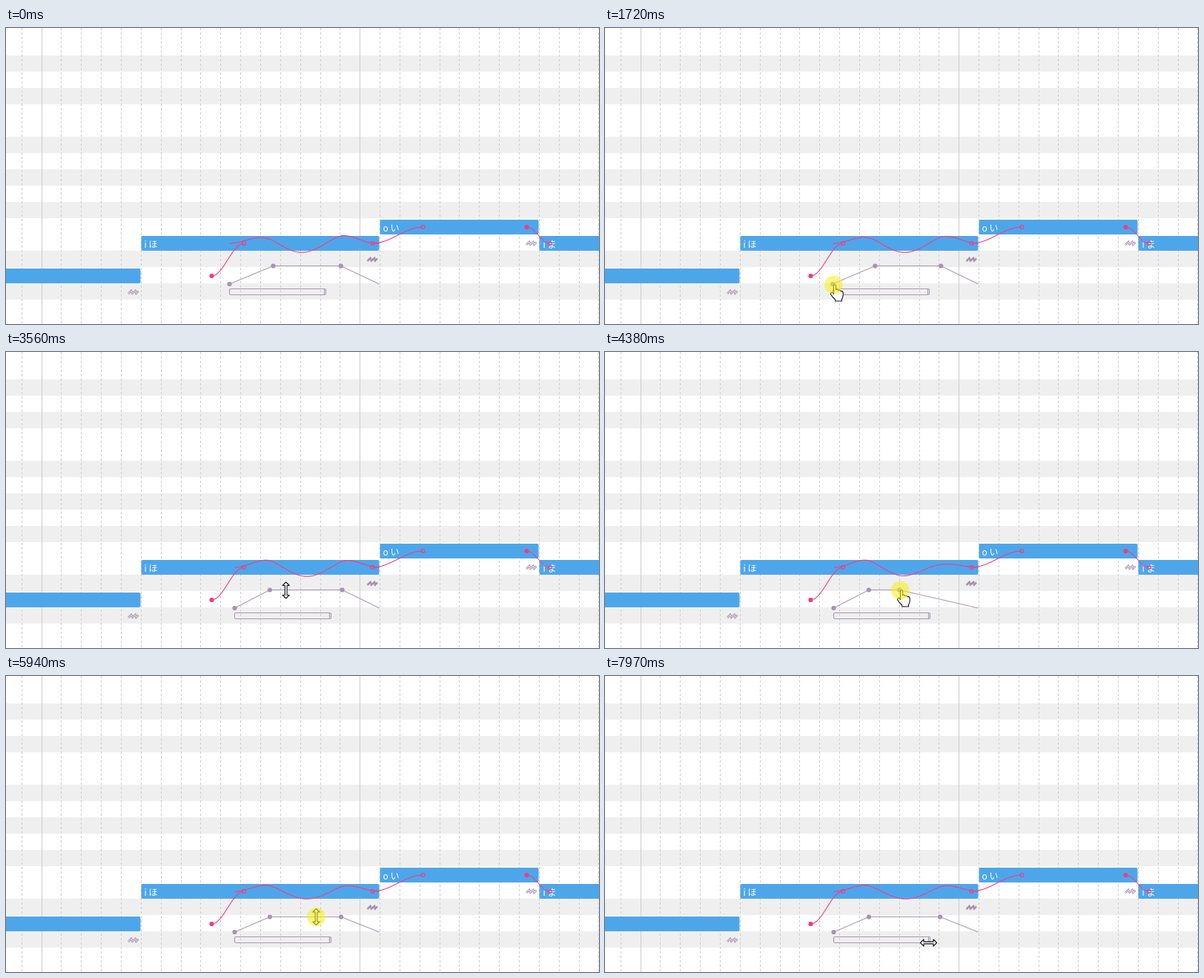
An HTML page for the animation above (8000 ms loop, 800 by 400 pixels).

```html
<!DOCTYPE html>
<html lang="ja">
<head>
<meta charset="utf-8">
<title>Vibrato editing</title>
<style>
html, body { margin: 0; width: 100%; height: 100%; overflow: hidden; background: #fff; }
svg { display: block; width: 800px; height: 400px; }
text { font: 300 12px "Noto Sans CJK JP", "Noto Sans CJK", sans-serif; fill: #fff; white-space: pre; }
.note { fill: #4ea6ea; }
.pitch { fill: none; stroke: #f8397f; stroke-width: 1.1; }
.knob { fill: #f8397f; }
.vib { fill: none; stroke: #a898b0; stroke-width: 1.1; }
.dot { fill: #a892b2; }
.cursor { fill: #fff; stroke: #111; stroke-width: 1.1; stroke-linejoin: round; }
#press { fill: #f5f01e; opacity: .58; }
</style>
</head>
<body>
<svg viewBox="0 0 800 400">
  <rect width="800" height="400" fill="#fff"/>
  <g id="grid"></g>
  <g class="note">
    <rect x="-5" y="325" width="186.5" height="20" rx="2"/>
    <rect x="182.5" y="281" width="321" height="20" rx="2"/>
    <rect x="504.5" y="259" width="214" height="20" rx="2"/>
    <rect x="719.5" y="281" width="90" height="20" rx="2"/>
  </g>
  <text x="186.5" y="296.7">i ほ</text>
  <text x="508.5" y="274.7">o い</text>
  <text x="724.5" y="296.7">i ま</text>
  <g id="icons" fill="none"></g>
  <g id="bends"></g>
  <path id="wave" class="pitch"/>
  <path id="env" class="vib"/>
  <g class="dot">
    <circle id="dotS" r="3.1" cy="346"/>
    <circle id="dotA" r="3.1"/>
    <circle id="dotB" r="3.1"/>
  </g>
  <g id="period" class="vib">
    <rect x=".5" y="352.5" width="130" height="8" rx="1.5"/>
    <path d="M128.5 352.5v8"/>
  </g>
  <path id="cursor" class="cursor"/>
  <circle id="press" r="12.3"/>
</svg>
<script>
const LOOP = 8000, STEP = 100, END = 503.5, BASE = 346, MID = 291, PERIOD = 130;
const $ = id => document.getElementById(id);
const set = (el, attrs) => { for (const k in attrs) el.setAttribute(k, attrs[k]); };
function add(parent, tag, attrs) {
  const el = document.createElementNS('http://www.w3.org/2000/svg', tag);
  set(el, attrs);
  parent.appendChild(el);
}

// Piano roll: one row per semitone, black keys shaded
for (let row = 0; row < 18; row++)
  if ('010100101010010100'[row] === '1')
    add($('grid'), 'rect', { y: 15 + row * 22, width: 800, height: 22, fill: '#efefef' });
for (let k = -1; k < 29; k++) {
  const x = Math.floor(48.05 + k * 26.854) + .5, bar = k % 16 === 0;
  add($('grid'), 'path', { d: `M${x} 0V400`, stroke: '#cbcbcb', 'stroke-dasharray': bar ? 'none' : '3 3' });
}

// Vibrato toggles
function icon(x, y, hollow) {
  const d = `M${x - 6} ${y + 2}l4-4 1.5 3.5 4-3.5 1 3.5 3-3`;
  add($('icons'), 'path', { d, stroke: '#a692b0', 'stroke-width': 2.6 });
  if (hollow) add($('icons'), 'path', { d, stroke: hollow, 'stroke-width': .9 });
}
icon(171, 357, '#efefef');
icon(493.5, 313);
icon(708, 291, '#fff');

// Pitch bends between neighbouring notes
function bend(x0, y0, x1, y1, openStart) {
  const dx = (x1 - x0) * .37;
  add($('bends'), 'path', { class: 'pitch', d: `M${x0} ${y0}C${x0 + dx} ${y0} ${x1 - dx} ${y1} ${x1} ${y1}` });
  add($('bends'), 'circle', { class: openStart ? 'pitch' : 'knob', cx: x0, cy: y0, r: openStart ? 2.5 : 3.1 });
  add($('bends'), 'circle', { class: 'pitch', cx: x1, cy: y1, r: 2.5 });
}
bend(277.5, 335, 321, 291);
bend(494.5, 291, 562.5, 269, true);
bend(702.5, 269, 734, 291);

function ease(t, from, to) {
  const u = Math.min(1, Math.max(0, (t - from) / (to - from)));
  return u * u * (3 - 2 * u);
}
// Out and back: 0 -> 1 -> 0
const swing = (t, from, peak, to) => ease(t, from, peak) - ease(t, peak, to);

// Vibrato settings: start, fade-in end, fade-out start, plateau height, phase
function pose(t) {
  const s = 301.5 + 7 * ease(t, 1260, 1770) - 48.5 * swing(t, 900, 1260, 1770);
  const len = END - s;
  return {
    s,
    a: s + len * .292 - 9.5 * ease(t, 2900, 3260) - 41.5 * swing(t, 2540, 2900, 3260),
    b: END - len * .256 - 1.5 * ease(t, 4380, 4800) - 56.5 * swing(t, 3980, 4380, 4800),
    top: 321.5 + 4 * ease(t, 5600, 5700) - 19.5 * swing(t, 5200, 5600, 5700) + 8.5 * swing(t, 5600, 5800, 5900),
    shift: 68.5 * swing(t, 6950, 7150, 7550)
  };
}

// Times the button is held, and the handle it holds
const drags = [
  { from: 0, to: 100, at: p => [269, 367] },
  { from: 920, to: 1940, at: p => [p.s, 347] },
  { from: 2540, to: 3360, at: p => [p.a, 322] },
  { from: 4080, to: 4900, at: p => [p.b, 322] },
  { from: 5200, to: 6230, at: p => [418.5, p.top], shape: 'ns' },
  { from: 6950, to: 7550, at: p => [388 + p.shift, 358] },
  { from: LOOP, to: LOOP, at: p => [436.5, 360.5] }
];

// The picture advances in steps counted from each press or release
function stepTime(t) {
  const marks = drags.flatMap(g => [g.from, g.to]).filter(m => m <= t);
  const mark = Math.max(...marks);
  return mark + Math.floor((t - mark) / STEP) * STEP;
}

const shapes = {
  arrow: 'M0 0V16L3.7 12.6 6.2 18.4 8.6 17.4 6.1 11.7H11.3Z',
  hand: 'M0 12.5V1.2Q0-.3 1.5-.3T3.1 1.2V7Q3.3 5.9 4.7 6.1T6.4 7.9Q6.8 7 8.1 7.3T9.6 9Q10.1 8.3 11.2 8.6T12.7 10.5V14Q12.7 17 11 19.3V22H2.2V20Q-2.2 16-3.8 13-4.5 11.2-3.1 10.5-1.6 10 0 12.5Z',
  ew: 'M-11 0L-6.5-4.6V-1.4H6.5V-4.6L11 0 6.5 4.6V1.4H-6.5V4.6Z',
  ns: 'M0-11L4.6-6.5H1.4V6.5H4.6L0 11-4.6 6.5H-1.4V-6.5H-4.6Z'
};

function hover(x, y, p) {
  const left = p.s + p.shift, right = left + PERIOD;
  if (y > 351 && y < 362 && x > left && x < right) return x > right - 2.5 ? 'ew' : 'hand';
  const dots = [[p.s, BASE], [p.a, p.top], [p.b, p.top]];
  if (dots.some(d => Math.hypot(x - d[0], y - d[1]) < 6)) return 'hand';
  return Math.abs(y - p.top) < 3 && x > p.a && x < p.b ? 'ns' : 'arrow';
}

function mouse(t, p) {
  const i = drags.findLastIndex(g => g.from <= t), held = drags[i];
  // a dragged handle trails the pointer a little
  if (t < held.to) return { at: held.at(pose(t + 40)), shape: held.shape || 'hand', pressed: true };
  const next = drags[i + 1], u = ease(t, held.to, next.from - STEP);
  const [x0, y0] = held.at(pose(held.to)), [x1, y1] = next.at(pose(next.from));
  const at = [x0 + (x1 - x0) * u, y0 + (y1 - y0) * u];
  return { at, shape: hover(...at, p) };
}

function draw(t) {
  const p = pose(t), { s, a, b, top, shift } = p;
  const depth = (BASE - top) / 2;
  let d = '';
  for (let x = s; ; x = Math.min(x + 2, END)) {
    const gain = Math.min(1, (x - s) / (a - s), (END - x) / (END - b));
    const y = MID - depth * gain * Math.sin(2 * Math.PI * (x - s + shift) / PERIOD);
    d += (d ? 'L' : 'M') + x.toFixed(2) + ' ' + y.toFixed(2);
    if (x >= END) break;
  }
  set($('wave'), { d });
  set($('env'), { d: `M${s} ${BASE}L${a} ${top}H${b}L${END} ${BASE}` });
  set($('dotS'), { cx: s });
  set($('dotA'), { cx: a, cy: top });
  set($('dotB'), { cx: b, cy: top });
  set($('period'), { transform: `translate(${Math.round(s + shift - .5)})` });

  const shown = t >= drags[0].to, { at: [x, y], shape, pressed } = mouse(t, p);
  set($('cursor'), { d: shown ? shapes[shape] : '', transform: `translate(${x} ${y})` });
  set($('press'), { cx: x, cy: y, visibility: shown && pressed ? 'visible' : 'hidden' });
}

const t0 = performance.now();
function tick() {
  draw(stepTime((performance.now() - t0) % LOOP));
  requestAnimationFrame(tick);
}
tick();
</script>
</body>
</html>
```
